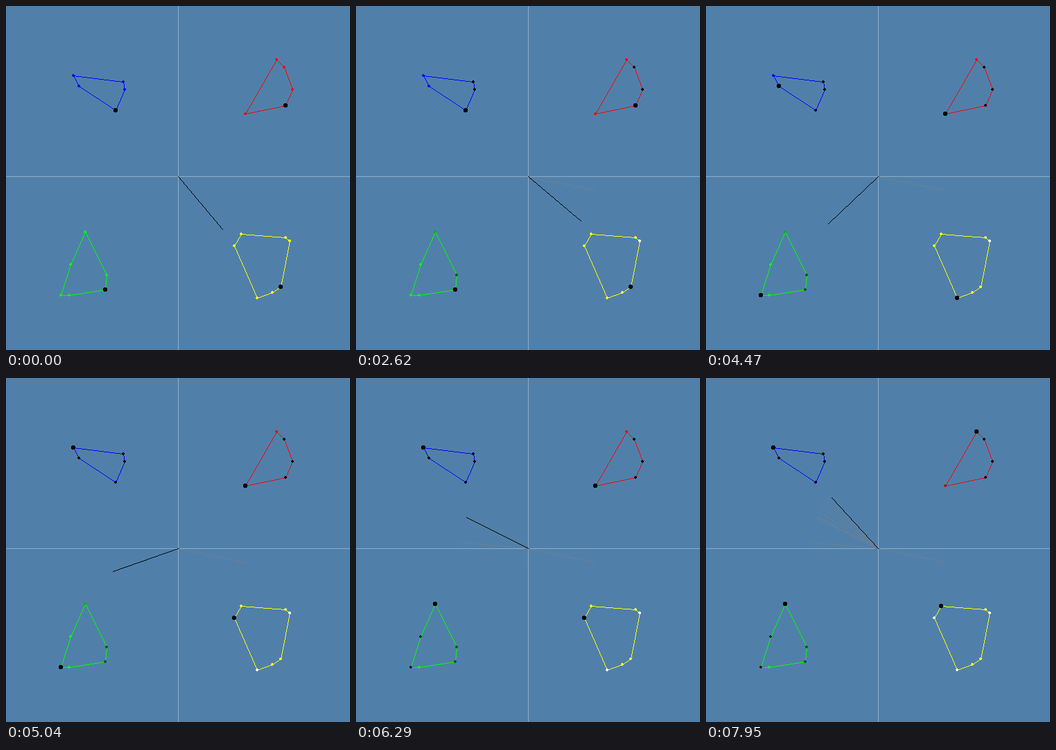
Write a matplotlib script that moves like this. It is 496 px wide and 495 px high and loops after 8000 ms.

```python
import numpy as np
import matplotlib.pyplot as plt
from matplotlib.animation import FuncAnimation
from matplotlib.colors import to_rgb

W, H, DPI = 496, 495, 64
STEP, LOOP = 20, 8000
CX, CY, R = 248, 245, 100

# Each vertex: x, y, then its colours after the first and later visits
SHAPES = [
    ("#0000ff", [(158, 150, "#0000ff", "black"), (171, 120, "black"),
                 (169, 109, "black"), (97, 100, "black"), (105, 115, "black")]),
    ("#ff0000", [(403, 143, "black"), (413, 120, "black"), (401, 88, "black"),
                 (390, 77, "black"), (345, 155, "#c00000")]),
    ("#00ff00", [(143, 408, "black", "#006000"), (145, 387, "black", "#006000"),
                 (114, 325, "#00b400"), (93, 372, "#004000"),
                 (79, 416, "#102010"), (91, 416, "#00ff00")]),
    ("#ffff00", [(396, 404, "#ffff00"), (409, 338, "white"), (403, 333, "#ffff00"),
                 (339, 328, "#ffff00"), (329, 345, "white"), (362, 420, "white"),
                 (384, 412, "#ffff00")]),
]

# Hand angle in degrees, clockwise from the right
TIMES = [0, 110, 310, 1080, 2070, 2620, 2830, 3310,
         3780, 4470, 5600, 6230, 7050, 7950]
ANGLES = [49.9, 49.4, 43, -35.1, -26, 40.1, 60, 98,
          101.5, 136.6, 185.2, 206.3, 215.6, 227.5]
# Moves: start, end, number of intervals; the hand rests in between
MOVES = [(0, 0, 1), (110, 110, 1), (310, 1080, 11),
         (2070, 3310, 18), (3780, 7950, 60)]
TRAILS = [11.7, 185.2, 206.3, 208, 212, 215.6, 219, 222.5, 225]
FAINT_TRAIL = 125


def hand_angle(t):
    start, end, n = [m for m in MOVES if m[0] <= t][-1]
    if end > start:
        gap = (end - start) / n
        t = start + min(int((t - start) / gap + 0.15), n) * gap
    else:
        t = start
    return np.interp(t, TIMES, ANGLES)


def tip(deg):
    a = np.radians(deg)
    return CX + int(R * np.cos(a)), CY + int(R * np.sin(a))


def support(verts, deg):
    a = np.radians(deg)
    return int(np.argmax([v[0] * np.cos(a) + v[1] * np.sin(a) for v in verts]))


angles = [hand_angle(i * STEP + STEP / 2) for i in range(LOOP // STEP)]


def visit_history(verts):
    """Active vertex and number of past visits per vertex, for each tick."""
    left, prev, out = [0] * len(verts), None, []
    for deg in angles:
        k = support(verts, deg)
        if prev is not None and k != prev:
            left[prev] += 1
        out.append((k, tuple(left)))
        prev = k
    return out


history = [visit_history(verts) for _, verts in SHAPES]


def rgb(color):
    return np.round(np.array(to_rgb(color)) * 255).astype(np.uint8)


def line(img, p, q, color):
    """One pixel wide line without smoothing."""
    n = max(abs(q[0] - p[0]), abs(q[1] - p[1])) + 1
    xs, ys = (np.floor(np.linspace(a, b, n) + 0.5).astype(int)
              for a, b in zip(p, q))
    img[ys, xs] = rgb(color)


def dot(img, p, r, color):
    x, y = p
    d = np.arange(-r, r) + 0.5
    inside = d[:, None] ** 2 + d ** 2 <= r * r
    img[y - r:y + r, x - r:x + r][inside] = rgb(color)


def render(i):
    t, deg = i * STEP + STEP / 2, angles[i]
    img = np.empty((H, W, 3), np.uint8)
    img[:] = rgb("#5080aa")
    img[:, CX] = img[CY] = rgb("#8cacc8")

    if t > 2350:
        if deg > FAINT_TRAIL:
            line(img, (CX, CY), tip(FAINT_TRAIL), "#5880a3")
        for d in TRAILS:
            if deg > d:
                line(img, (CX, CY), tip(d), "#6c7f92")
    line(img, (CX, CY), tip(deg), "black")

    for (color, verts), hist in zip(SHAPES, history):
        active, left = hist[i]
        pts = [v[:2] for v in verts]
        for p, q in zip(pts, pts[1:] + pts[:1]):
            line(img, p, q, color)
        for v, n in zip(verts, left):
            worn = v[2:]
            dot(img, v[:2], 2, worn[min(n, len(worn)) - 1] if n else color)
        dot(img, pts[active], 3, "black")
    return img


fig = plt.figure(figsize=(W / DPI, H / DPI), dpi=DPI)
stage = fig.figimage(render(0), origin="upper")


def update(i):
    stage.set_data(render(i))
    return [stage]


anim = FuncAnimation(fig, update, frames=LOOP // STEP, interval=STEP,
                     repeat=True, repeat_delay=0, blit=False)
plt.show()
```
